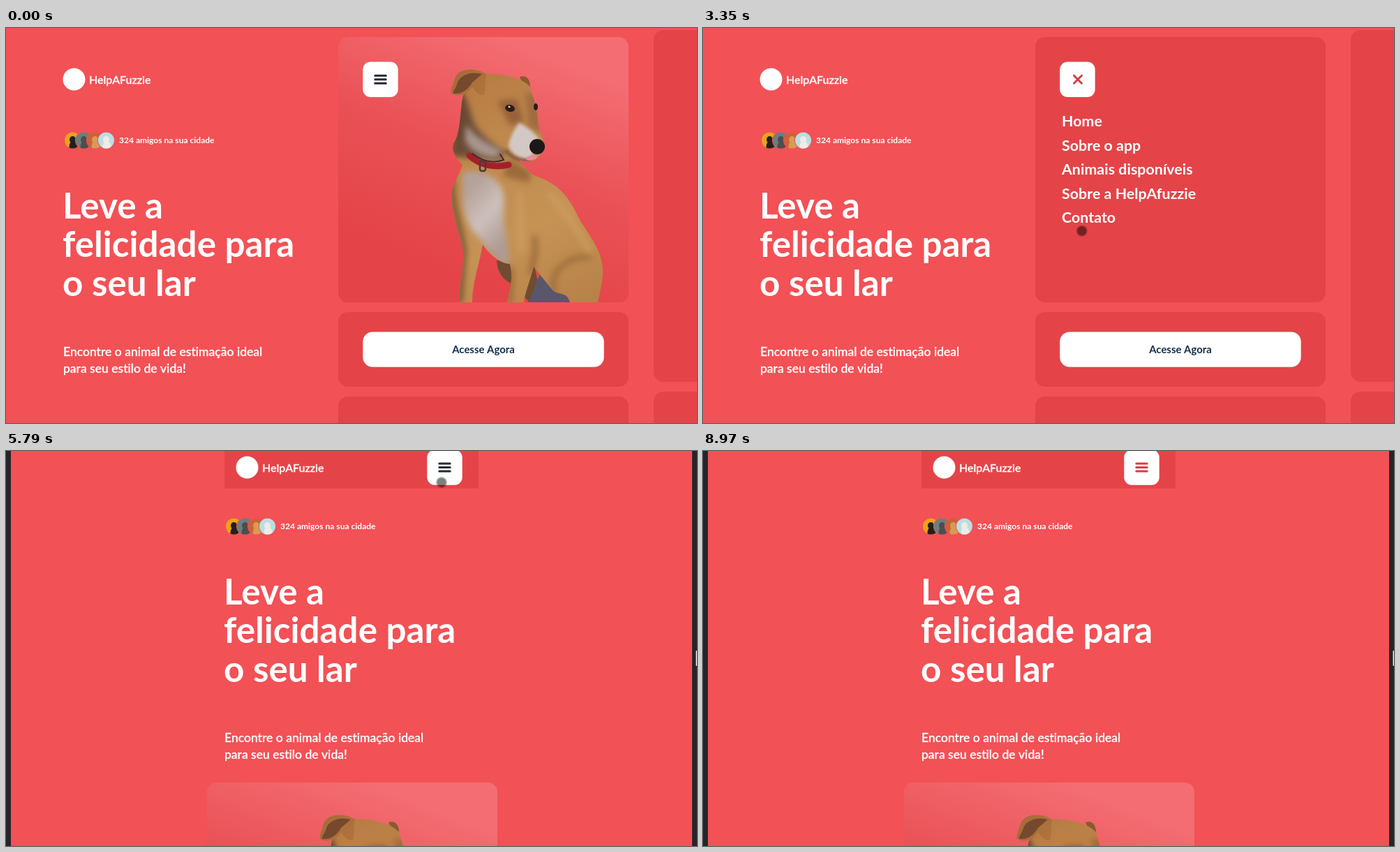
Write an HTML page with a canvas that moves like this. It is 990 by 566 pixels and loops after 9.5 s.

```html
<!DOCTYPE html>
<html lang="pt">
<head>
<meta charset="utf-8">
<style>
  html, body { margin: 0; width: 990px; height: 566px; overflow: hidden; background: #f25156; }
  canvas { display: block; }
</style>
</head>
<body>
<canvas id="stage" width="990" height="566"></canvas>
<script>
const LOOP = 9500, MOBILE_AT = 4990;
const BG = '#f25156', PANEL = '#e44448', DARK = '#242a33', RED = '#dc3d42';
let ctx = document.getElementById('stage').getContext('2d');
const stage = ctx;

const clamp = v => Math.max(0, Math.min(1, v));
const ramp = (t, a, b) => clamp((t - a) / (b - a));
const smooth = v => v * v * (3 - 2 * v);

function text(str, x, y, size, weight = 700, color = '#fff', align = 'left') {
  ctx.font = `${weight} ${size}px Lato, "Open Sans", sans-serif`;
  ctx.letterSpacing = '0.02px'; // turns ligatures off
  ctx.fillStyle = ctx.strokeStyle = color;
  ctx.textAlign = align;
  ctx.fillText(str, x, y);
  if (weight < 700) {
    ctx.lineWidth = .35;
    ctx.strokeText(str, x, y);
  }
}
function rect(x, y, w, h, r, color) {
  ctx.beginPath();
  ctx.roundRect(x, y, w, h, r);
  ctx.fillStyle = color;
  ctx.fill();
}
function oval(x, y, rx, ry, color, angle = 0) {
  ctx.beginPath();
  ctx.ellipse(x, y, rx, ry, angle, 0, 7);
  ctx.fillStyle = color;
  ctx.fill();
}
function shape(d, color) {
  ctx.fillStyle = color;
  ctx.fill(new Path2D(d));
}
function stroke(d, color, width) {
  ctx.strokeStyle = color;
  ctx.lineWidth = width;
  ctx.lineCap = 'round';
  ctx.stroke(new Path2D(d));
}
function gradient(x0, y0, x1, y1, ...colors) {
  const g = ctx.createLinearGradient(x0, y0, x1, y1);
  colors.forEach((c, i) => g.addColorStop(i / (colors.length - 1), c));
  return g;
}
function at(x, y, draw) {
  ctx.save();
  ctx.translate(x, y);
  draw();
  ctx.restore();
}

// The dog is painted once and reused.
function paintDog() {
  const layer = document.createElement('canvas');
  layer.width = 990;
  layer.height = 566;
  ctx = layer.getContext('2d');
  shape('M703 333L757 340L768 393H750L724 366C712 361 704 350 703 333Z', '#6f4c30');
  shape('M748 393C760 374 758 356 770 350L812 393Z', '#5a566c');

  const body = 'M684 66C705 65 735 68 751 84C754 98 762 112 763 140L771 165C772 180 758 193 746 191' +
    'C740 191 738 190 734 187C742 200 752 209 758 212C790 222 806 240 822 275C838 300 853 318 855 345' +
    'C856 365 850 380 848 393H808C803 375 790 386 780 372L756 342C750 365 744 378 742 393H718' +
    'C724 370 726 355 722 338C708 338 690 322 683 310C678 340 668 365 668 393H650' +
    'C648 372 656 345 655 320C650 290 637 270 639 235C640 222 650 210 654 196C644 186 638 176 641 166' +
    'C652 150 650 120 655 96Z';
  shape('M736 70C746 67 752 74 751 88L741 82Z', '#8a5a30');
  shape(body, gradient(660, 60, 820, 393, '#b67a42', '#c08a4e', '#c69355', '#b88248'));

  ctx.save();
  ctx.clip(new Path2D(body));
  ctx.filter = 'blur(4px)';
  // neck and throat
  shape('M648 92C660 92 664 118 672 140C688 160 704 172 716 178L706 190L640 184Z', '#6d4c37');
  shape('M658 138C672 156 690 166 710 174L704 186C682 186 664 176 658 160Z', '#a8958d');
  shape('M720 186L752 206L750 222L712 212Z', '#9c6a3a');
  // chest
  shape('M654 208C678 200 698 210 710 228C717 246 710 265 715 290C721 310 719 330 722 341C705 336 690 318 682 305C665 290 655 270 654 245Z',
    gradient(655, 240, 720, 300, '#b5a29a', '#cdc0bc', '#ae9b95'));
  // face
  shape('M704 104L732 102L742 134L722 140Z', '#96613a');
  shape('M744 92L766 96L768 150L748 142Z', '#a06c41');
  ctx.filter = 'blur(2px)';
  shape('M735 136C746 141 758 150 764 160L752 187C738 190 724 182 720 168C722 156 728 146 735 136Z', '#d3c8c5');
  stroke('M716 176C728 189 740 191 752 190', '#6b4a40', 4);
  ctx.filter = 'blur(5px)';
  stroke('M650 95C652 140 644 160 640 180M638 215C638 260 653 290 656 320L650 393', '#5d4029', 6);
  stroke('M757 300C760 320 757 330 752 350M724 345L722 393', '#8f6236', 6);
  stroke('M785 380C778 350 800 328 836 328', '#94673a', 6);
  stroke('M780 240C808 268 824 300 836 318M736 240L738 320', '#cb9a5d', 10);
  ctx.restore();

  shape('M688 66C674 56 648 57 643 72C641 82 634 92 640 95C650 99 663 94 668 84C672 92 680 97 685 96C688 86 686 76 688 66Z',
    gradient(640, 60, 688, 90, '#a46a38', '#b0733b'));
  shape('M682 66C668 62 652 66 647 78C644 88 640 90 641 94C654 95 662 88 668 78Z', '#75492e');
  oval(722, 115, 7, 5, '#2c1c17', .2);
  oval(759, 113, 3, 5, '#2c1c17');
  oval(721, 113, 1.5, 1.2, '#ddd');
  oval(753, 186, 8, 3.5, '#e68c9a', -.2);
  oval(761, 170, 11, 11, '#1c1718');
  stroke('M664 183C682 199 702 200 720 196', '#a51f2b', 9);
  stroke('M668 180C684 192 700 194 713 189L708 181', '#41282a', 2);
  ctx.beginPath();
  ctx.roundRect(679, 190, 8, 15, 3);
  ctx.strokeStyle = '#4a3a3a';
  ctx.lineWidth = 2.5;
  ctx.stroke();
  ctx.clearRect(0, 393, 990, 173);
  ctx = stage;
  return layer;
}
const dog = paintDog();

function dogCard(alpha) {
  ctx.save();
  ctx.globalAlpha = alpha;
  rect(476, 13, 416, 380, 14, gradient(600, 330, 720, 20, PANEL, '#e95156', '#f36d72'));
  ctx.clip();
  ctx.drawImage(dog, 0, 0);
  ctx.restore();
}

function logo() {
  oval(97.5, 73.5, 16, 16, '#fff');
  text('HelpAFuzzie', 119, 80, 16, 500);
}

const FRIENDS = [['#eca21c', '#241f1e'], ['#68807f', '#514b50'], ['#cc6238', '#d99a55'], ['#b9dfe2', '#efebe6']];
function hero() {
  FRIENDS.forEach(([back, fur], i) => {
    const x = 95.5 + i * 16;
    oval(x, 161, 12.5, 12.5, BG);
    oval(x, 161, 11.5, 11.5, back);
    ctx.save();
    ctx.clip();
    oval(x, 160, 4.5, 5, fur);
    oval(x + 1, 170, 6, 8, fur);
    ctx.restore();
  });
  text('324 amigos na sua cidade', 162, 164.5, 12);
  ['Leve a', 'felicidade para', 'o seu lar'].forEach((s, i) => text(s, 81, 272.5 + i * 55.7, 51.2));
  text('Encontre o animal de estimação ideal', 82, 469.5, 17.5, 500);
  text('para seu estilo de vida!', 82, 493.5, 17.5, 500);
}

function menuItems() {
  ['Home', 'Sobre o app', 'Animais disponíveis', 'Sobre a HelpAfuzzie', 'Contato']
    .forEach((s, i) => text(s, 514, 141.3 + i * 34.45, 21.4));
}

function bar(x, y, w, alpha, color, width = 3) {
  ctx.globalAlpha = clamp(alpha);
  stroke(`M${x - w} ${y}H${x + w}`, color, width);
}

// Bars scatter to the right on opening, a cross takes their place, then red bars return.
function menuButton(t, open, close) {
  const e = t - open;
  const flash = e < 130 ? ramp(e, 0, 130) : 1 - ramp(e, 150, 500);
  rect(-25.2, -25.2, 50.4, 50.4, 11, '#fff');
  ctx.globalAlpha = flash;
  rect(-25.2, -25.2, 50.4, 50.4, 11, '#abe1f5');
  if (t < close) {
    const f = Math.max(0, e / 130), fade = 1 - ramp(e, 130, 300);
    bar(19 * f, -5.5 - 13 * f, 7.7, (1 - .25 * clamp(f)) * fade, DARK);
    bar(35 * f, 0, 7.7, (1 - .55 * clamp(f)) * fade, DARK);
    bar(19 * f, 5.5 + 13 * f, 7.7, (1 - .25 * clamp(f)) * fade, DARK);
  } else {
    for (const y of [-5.5, 0, 5.5]) bar(0, y, 7.7, ramp(t, close + 80, close + 300), RED);
  }
  ctx.globalAlpha = smooth(ramp(e, 200, 500)) * (1 - ramp(t, close, close + 180));
  stroke('M-5 -5.5L6 5.5M6 -5.5L-5 5.5', '#cf4044', 3);
  ctx.globalAlpha = 1;
}

function desktop(t) {
  const open = ramp(t, 1540, 1670) - ramp(t, 3940, 4120);
  rect(476, 13, 416, 380, 14, PANEL);
  rect(476, 407, 416, 107, 14, PANEL);
  rect(476, 528, 416, 100, 14, PANEL);
  rect(928, 3, 100, 504, 14, PANEL);
  rect(928, 521, 100, 100, 14, PANEL);
  menuItems();
  dogCard(1 - open);
  rect(511.3, 435.4, 345.4, 50.4, 14, '#fff');
  text('Acesse Agora', 684, 465.5, 14.9, 700, '#14304a', 'center');
  logo();
  hero();
  at(536.5, 73.7, () => menuButton(t, 1560, 3960));
}

function mobile(t) {
  const open = smooth(ramp(t, 6660, 6980)) - smooth(ramp(t, 7990, 8310));
  const drop = 204.5 * open;
  at(231, -53 + drop, hero);
  at(-188, 462 + drop, () => dogCard(1));
  ctx.save();
  rect(313, -20, 364, 73.5 + drop, [0, 0, 14 * open, 14 * open], PANEL);
  ctx.clip();
  rect(330, 63, 331, 1.3, 0, '#ea786f');
  at(-184, -39, menuItems);
  ctx.restore();
  at(248, -50, logo);
  at(628.5, 23.5, () => menuButton(t, 6680, 8010));
  rect(0, 0, 7, 566, 0, '#252529');
  rect(983, 0, 7, 566, 0, '#252529');
  rect(988.5, 286, 4, 22, 1, '#e8e8e8');
}

// Pointer stops as [time, x, y].
const DESKTOP_PATH = [
  [260, 900, 531], [600, 660, 330], [900, 499, 150], [1150, 523, 93], [1360, 529, 82], [1690, 529, 82],
  [2480, 533, 78], [2610, 533, 74], [2760, 533, 74], [3320, 543, 295], [3690, 530, 79], [3820, 529, 77],
  [3960, 529, 77], [4280, 680, 240], [4600, 917, 560], [4660, 930, 580]
];
const MOBILE_PATH = [
  [4990, 911, 572], [5350, 780, 330], [5650, 636, 90], [5790, 624, 45], [5930, 624, 35], [6060, 624, 33],
  [6750, 624, 33], [7250, 645, 232], [7600, 639, 41], [7860, 634, 26], [8010, 634, 26], [8400, 735, 230],
  [8900, 911, 563], [8970, 920, 580]
];

// Monotone cubic through the stops, so rests stay still.
function follow(path, t, axis) {
  const last = path.length - 1;
  const i = path.findIndex(p => p[0] > t) - 1;
  if (i < 0) return path[last][axis];
  const slope = k => (path[k + 1][axis] - path[k][axis]) / (path[k + 1][0] - path[k][0]);
  const tangent = k => {
    if (k === 0 || k === last) return 0;
    const a = slope(k - 1), b = slope(k);
    return a * b > 0 ? 2 * a * b / (a + b) : 0;
  };
  const span = path[i + 1][0] - path[i][0], u = (t - path[i][0]) / span;
  const h = smooth(u);
  return path[i][axis] * (1 - h) + path[i + 1][axis] * h +
    span * (tangent(i) * u * (1 - u) ** 2 - tangent(i + 1) * u * u * (1 - u));
}

function pointer(t) {
  if (t < 260 || (t >= 4660 && t < MOBILE_AT)) return;
  const path = t < MOBILE_AT ? DESKTOP_PATH : MOBILE_PATH;
  const x = follow(path, t, 1), y = follow(path, t, 2);
  const tint = t >= 7800 && t < 8010 ? '190,192,30' : '0,0,0';
  oval(x, y, 8, 8, `rgba(${tint},.25)`);
  oval(x, y, 6.5, 6.5, `rgba(${tint},.33)`);
}

function frame(now) {
  const t = now % LOOP;
  rect(0, 0, 990, 566, 0, BG);
  (t < MOBILE_AT ? desktop : mobile)(t);
  pointer(t);
  requestAnimationFrame(() => frame(performance.now() - start));
}
const start = performance.now();
frame(0);
</script>
</body>
</html>
```
